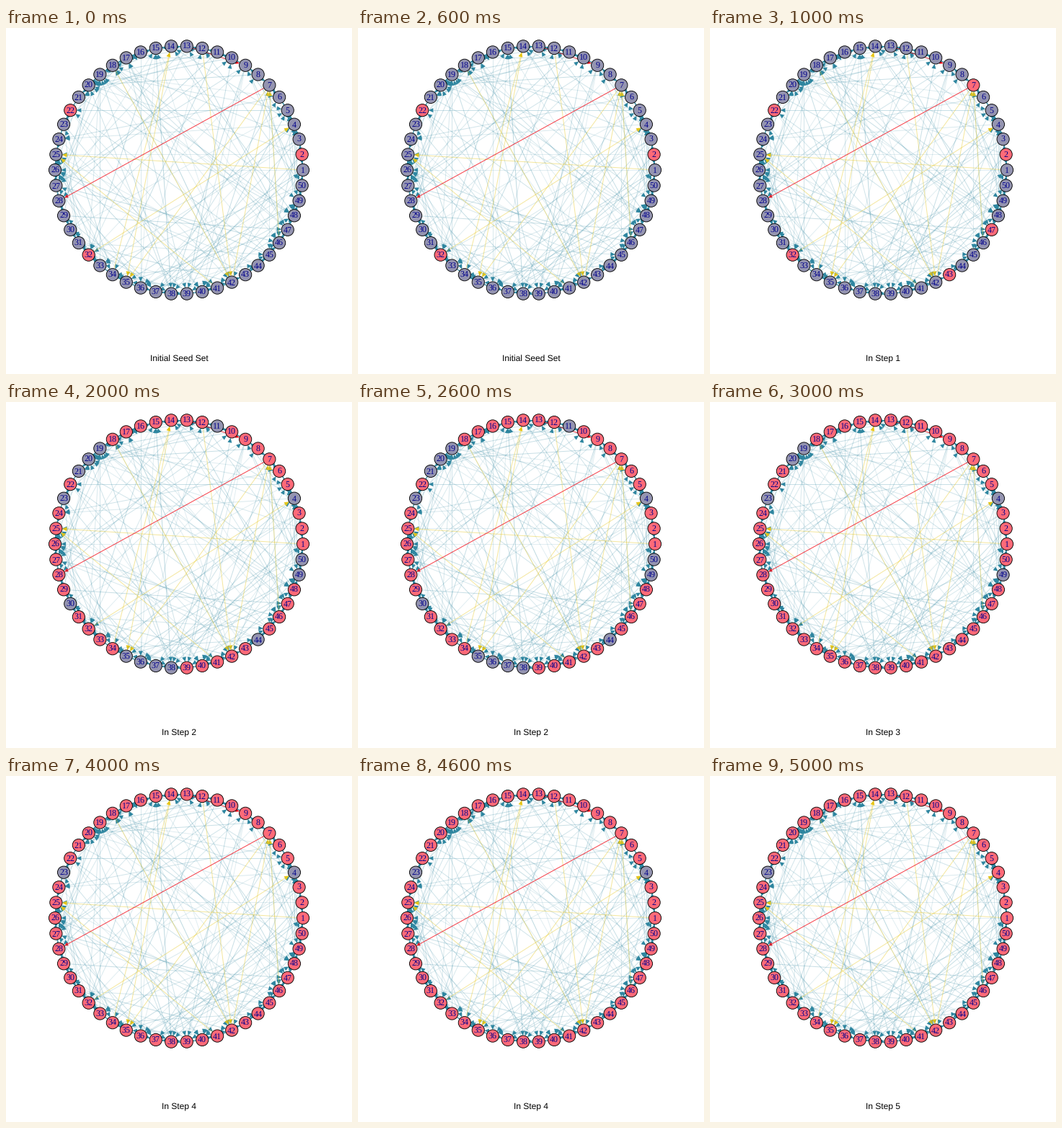
A matplotlib script that plays this animation: 480x480 px, repeating every 6 s.

```python
import numpy as np
import matplotlib.pyplot as plt
from matplotlib.animation import FuncAnimation
from matplotlib.collections import LineCollection, PolyCollection
from matplotlib.colors import to_rgba
from matplotlib.patches import Circle

plt.rcParams["text.hinting"] = "none"

SIZE, DPI = 480, 100
PX = 72 / DPI
N, CENTER, RING, NODE_R = 50, np.array([240, 197]), 172, 8.6
IDLE, ACTIVE = "#9494b0", "#ff6a78"
TEAL, GOLD, RED = "#2e86a0", "#e6c619", "#f5101c"

# Step in which the spread reaches a node; all others follow in step 2
REACHED = {
    0: [2, 22, 32],
    1: [7, 43, 47],
    3: [11, 21, 30, *range(35, 39), 44, 50],
    4: [19, 20, 49],
    5: [4],
    6: [23],
}
STEP_OF = {node: step for step, group in REACHED.items() for node in group}

RED_EDGES = [(7, 28), (13, 9)]
GOLD_EDGES = [(1, 25), (41, 25), (14, 35), (7, 35), (34, 14), (32, 4),
              (42, 7), (46, 7), (12, 42), (18, 42)]
LONG_EDGES = 165


def pos(node):
    a = 2 * np.pi * (node - 1) / N
    return CENTER + RING * np.array([np.cos(a), -np.sin(a)])


def random_edges(count, seed=4):
    """The one strong chord, then random links between distinct nodes."""
    rng = np.random.default_rng(seed)
    edges = [(15, 38), (38, 15)]
    while len(edges) < count:
        a, b = (int(v) for v in rng.integers(1, N + 1, 2))
        if a != b and (a, b) not in edges:
            edges.append((a, b))
    return edges


def arrow(edge, length, half):
    """Shaft and triangular head of an edge, ending at the node's rim."""
    a, b = pos(edge[0]), pos(edge[1])
    u = (b - a) / np.hypot(*(b - a))
    side = np.array([-u[1], u[0]])
    tip = b - u * NODE_R
    base = tip - u * length
    return [a, base], [tip, base + side * half, base - side * half]


def add_edges(edges, color, alpha, width=1, length=6.5, half=3):
    parts = [arrow(e, length, half) for e in edges]
    rgba = [to_rgba(color, al) for al in np.broadcast_to(alpha, len(edges))]
    ax.add_collection(LineCollection([p[0] for p in parts], colors=rgba,
                                     linewidths=width * PX))
    ax.add_collection(PolyCollection([p[1] for p in parts], facecolors=color,
                                     edgecolors="none"))


fig = plt.figure(figsize=(SIZE / DPI, SIZE / DPI), dpi=DPI, facecolor="white")
ax = fig.add_axes([0, 0, 1, 1])
ax.set(xlim=(0, SIZE), ylim=(SIZE, 0))
ax.axis("off")

shades = 0.14 + 0.04 * (np.arange(LONG_EDGES) % 4)
add_edges(random_edges(LONG_EDGES), TEAL, shades)
near = [(k, (k + 1) % N + 1) for k in range(1, N + 1)]
add_edges(near[::2] + [(b, a) for a, b in near[::3]], TEAL, 0.3)
add_edges(GOLD_EDGES, GOLD, 0.42)
add_edges(RED_EDGES, RED, 0.8, length=5.5, half=2.5)

ring = [[pos(k), pos(k + 1)] for k in range(1, N + 1)]
ax.add_collection(LineCollection(ring, colors=TEAL, linewidths=PX))

nodes = []
for k in range(1, N + 1):
    x, y = pos(k)
    z = 4 + 0.01 * k
    nodes.append(ax.add_patch(Circle((x, y), NODE_R, facecolor=IDLE, zorder=z,
                                     edgecolor="black", linewidth=0.9 * PX)))
    ax.text(x, y + 4, str(k), family="Liberation Serif", fontsize=12 * PX,
            color="#00008b", ha="center", va="baseline", zorder=z + 0.005)

caption = ax.text(240, 462, "", family="Liberation Sans", fontsize=12 * PX,
                  color="black", ha="center", va="baseline")


def update(i):
    for k, node in enumerate(nodes, 1):
        node.set_facecolor(ACTIVE if STEP_OF.get(k, 2) <= i else IDLE)
    caption.set_text(f"In Step {i}" if i else "Initial Seed Set")
    return [*nodes, caption]


anim = FuncAnimation(fig, update, frames=6, interval=1000,
                     repeat=True, repeat_delay=0, blit=False)
plt.show()
```
